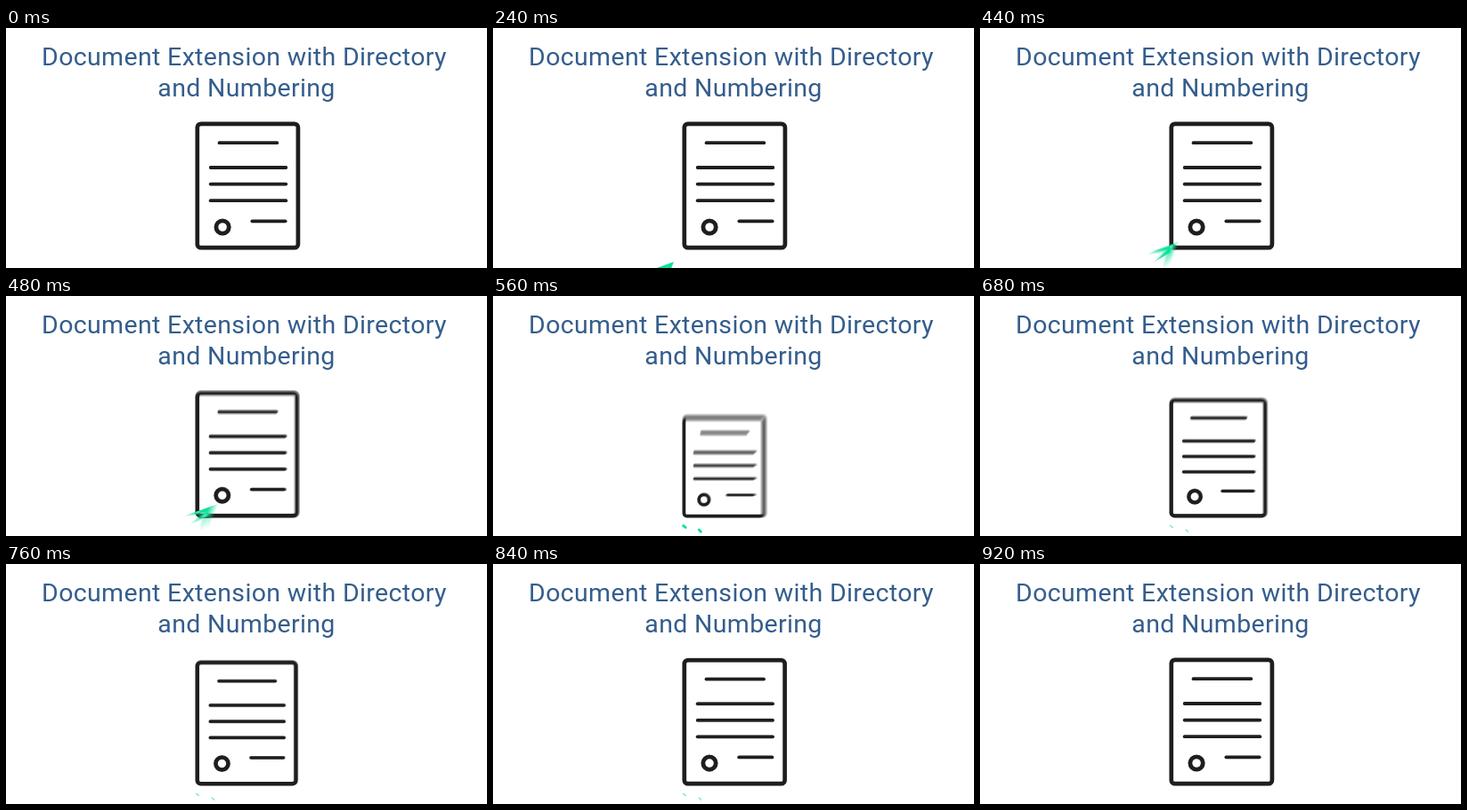
Recreate the animation shown at these times as an HTML page with a canvas. Size 540 by 270 pixels, loop 2080 ms.

```html
<!DOCTYPE html>
<html lang="en">
<head>
<meta charset="utf-8">
<title>Document Extension</title>
<style>
  html, body { margin: 0; width: 100%; height: 100%; overflow: hidden; background: #fff; }
  svg, canvas { position: absolute; left: 0; top: 0; width: 540px; height: 270px; }
  text {
    font: 400 28.5px Roboto, "Open Sans", sans-serif;
    letter-spacing: .35px;
    fill: #345d8c;
    text-anchor: middle;
  }
</style>
</head>
<body>
<svg viewBox="0 0 540 270">
  <text x="267.5" y="42">Document Extension with Directory</text>
  <text x="270" y="77">and Numbering</text>
</svg>
<canvas></canvas>
<script>
const LOOP = 2080, TICK = 40;
const SHUTTER = 28, SAMPLES = 15;
const INK = '#1f1f20', GREEN = '#08e19b', PALE = '#83ead0';
const ENTER = 40, SETTLE = 240, DASH = 360, HIT = 460, BOUNCE = 560, REST = 920;
const SQUASH = .23;

const canvas = document.querySelector('canvas');
const ctx = canvas.getContext('2d');
const ratio = window.devicePixelRatio || 1;
canvas.width = 540 * ratio;
canvas.height = 270 * ratio;

const progress = (t, from, to) => Math.min(1, Math.max(0, (t - from) / (to - from)));
const lerp = (a, b, u) => a + (b - a) * u;
const bezier = (a, b, c, u) => lerp(lerp(a, b, u), lerp(b, c, u), u);

// The page is squashed towards its lower left corner, then springs back.
function pageScale(t) {
  if (t < BOUNCE) return 1 - SQUASH * progress(t, HIT, BOUNCE) ** 3;
  return 1 - SQUASH * (1 - progress(t, BOUNCE, REST)) ** 2.65;
}

// The arrow creeps in, waits, then curves up to the page.
function arrowTip(t) {
  if (t < DASH) {
    const u = 1 - (1 - progress(t, ENTER, SETTLE)) ** 2;
    return [lerp(198, 203, u), lerp(269, 263, u)];
  }
  const u = progress(t, DASH, 520);
  return [bezier(203, 208, 244, u), bezier(263, 242, 232, u)];
}

function line(x1, y1, x2, y2, width, color) {
  ctx.strokeStyle = color;
  ctx.lineWidth = width;
  ctx.beginPath();
  ctx.moveTo(x1, y1);
  ctx.lineTo(x2, y2);
  ctx.stroke();
}

function drawPage(t) {
  const scale = pageScale(t);
  ctx.translate(213, 249);
  ctx.scale(scale, scale);
  ctx.translate(-213, -249);

  ctx.strokeStyle = INK;
  ctx.lineWidth = 4.7;
  ctx.beginPath();
  ctx.roundRect(214.8, 107.8, 113.1, 139.4, 4);
  ctx.stroke();

  line(239.5, 129.2, 304.3, 129.2, 3.7, INK);
  for (let i = 0; i < 3; i++) line(229.7, 157 + i * 18.6, 314.3, 157 + i * 18.6, 3.8, INK);
  line(276.3, 217.3, 313.7, 217.3, 3.7, INK);

  ctx.lineWidth = 4.8;
  ctx.beginPath();
  ctx.arc(243.1, 224, 7.2, 0, Math.PI * 2);
  ctx.stroke();
}

function drawArrow(t) {
  ctx.translate(...arrowTip(t));
  ctx.fillStyle = GREEN;
  ctx.beginPath();
  ctx.moveTo(0, 0);
  for (const [x, y] of [[-29, 10.5], [-12, 9], [-22, 20], [-9, 12], [-11, 27.5]]) ctx.lineTo(x, y);
  ctx.fill();
}

// Averages the poses passed while the shutter is open.
function exposed(t, draw) {
  ctx.globalCompositeOperation = 'lighter';
  for (let i = 0; i < SAMPLES; i++) {
    ctx.save();
    ctx.globalAlpha = 1 / SAMPLES;
    draw(t + SHUTTER * i / (SAMPLES - 1));
    ctx.restore();
  }
  ctx.globalCompositeOperation = 'source-over';
}

// A layer of its own keeps the arrow's colour from adding to the page.
function drawSparks(t) {
  const fresh = t < BOUNCE + TICK;
  const width = fresh ? 2.8 : 1.6, color = fresh ? GREEN : PALE;
  line(213.6, 258.4, 216.2, 260.4, width, color);
  line(231.3, 263, 233.4, 265.2, width, color);
}

function render(time) {
  const t = Math.floor(time / TICK) * TICK;
  ctx.setTransform(ratio, 0, 0, ratio, 0, 0);
  ctx.clearRect(0, 0, 540, 270);
  ctx.lineCap = 'round';
  exposed(t, drawPage);
  if (t >= ENTER && t < BOUNCE) exposed(t, drawArrow);
  if (t >= BOUNCE && t < REST) drawSparks(t);
}

const start = performance.now();
function frame() {
  render((performance.now() - start) % LOOP);
  requestAnimationFrame(frame);
}
frame();
</script>
</body>
</html>
```
